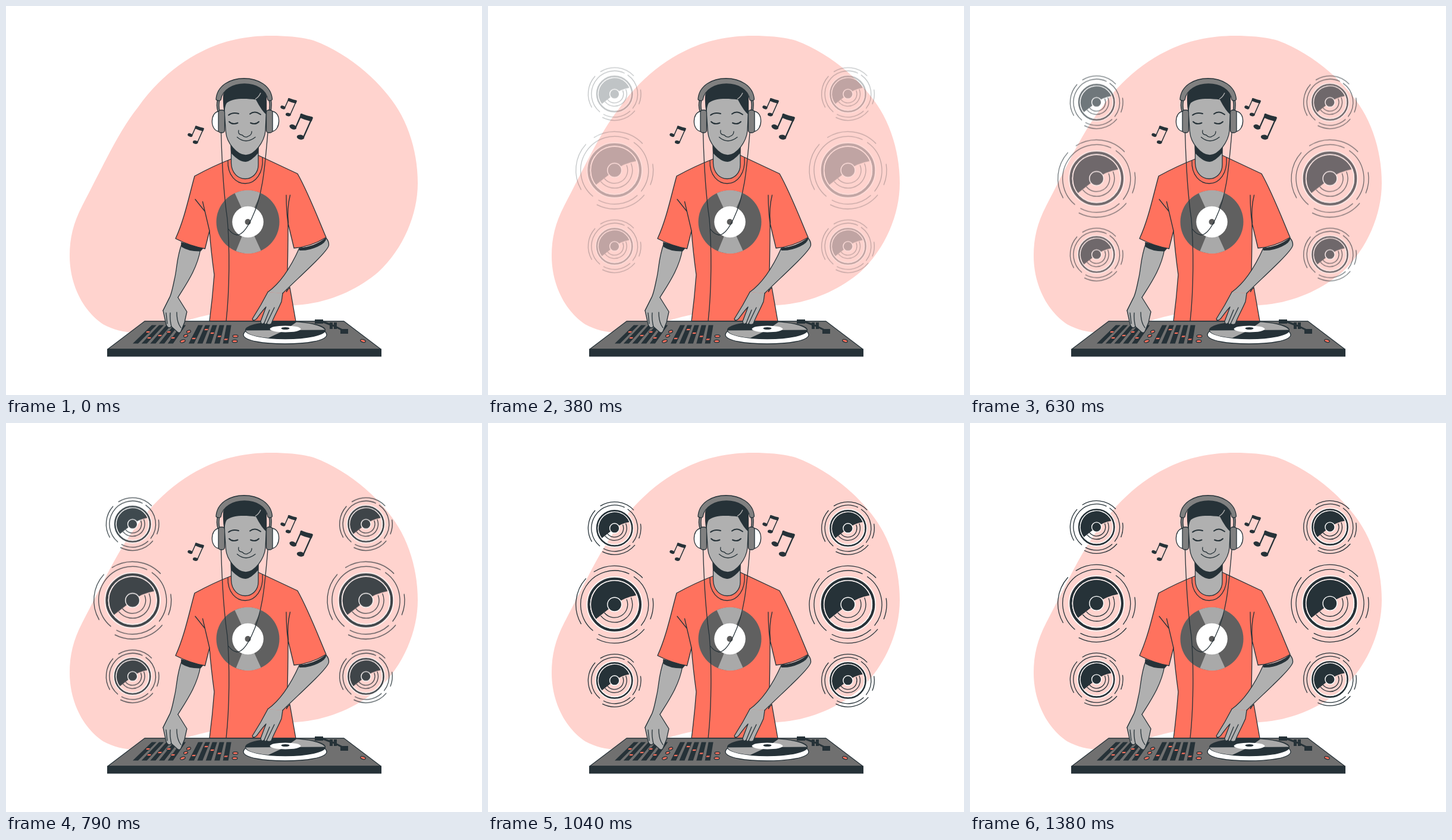
These frames come from a looping animation (800x654 px, 1.43 s). An HTML page:

```html
<!DOCTYPE html>
<html lang="en">
<head>
<meta charset="utf-8">
<title>DJ at the mixer</title>
<style>
html, body { margin: 0; width: 100%; height: 100%; overflow: hidden; background: #fff; }
svg { display: block; width: 100vw; height: 100vh; }
.ink { fill: #263238; }
.line { fill: none; stroke: #263238; stroke-width: 1.3; stroke-linecap: round; stroke-linejoin: round; }
.bold { stroke-width: 2; }
.skin { fill: #b0b0b0; }
.coral { fill: #ff725e; }
.grey { fill: #808080; }
.edge { stroke: #263238; stroke-width: 1.3; stroke-linejoin: round; stroke-linecap: round; }
#speakers * { vector-effect: non-scaling-stroke; }
</style>
</head>
<body>
<svg viewBox="0 0 800 654">
<defs>
  <g id="note" class="ink">
    <path d="M13 1Q14-.5 16 .8Q22 3 27 4L28 5L26.3 9.5Q19 8 12.500 5Z"/>
    <path class="line" style="stroke-width:1.6" d="M13.600 3L7.600 16.500M26.600 6L16.800 28"/>
    <ellipse cx="4.400" cy="16" rx="4.300" ry="2.700" transform="rotate(22 4.400 16)"/>
    <ellipse cx="13.300" cy="28" rx="4.400" ry="2.800" transform="rotate(10 13.300 28)"/>
  </g>
</defs>

<path fill="#ffd3ce" d="M445 50C475 50 500 53 517 58C582 82 635 134 659 174C681 210 692 255 692 298C692 350 668 408 626 447C590 478 540 500 487 503C430 508 390 511 342 519C318 524 300 530 260 542C225 553 192 551 163 535C130 513 107 469 107 420C107 390 113 365 128 336C165 265 190 210 222 170C250 130 290 95 330 76C365 58 405 50 445 50Z"/>

<g id="speakers"></g>

<use href="#note" x="305" y="201"/>
<use href="#note" x="461" y="154.500"/>
<use href="#note" transform="translate(476 180.500) scale(1.43)"/>

<!-- left forearm -->
<path class="skin edge" d="M296 398C286 425 288 440 283 460C279 480 277 486 275 490L264 512L289 490C304 466 322 440 327 408Z"/>
<path class="ink" d="M294 397L332 407L327 412.500Q307 413 295 405Z"/>

<!-- shirt -->
<path class="coral edge" d="M379 257Q348 269 317 286C307 322 300 358 285 391Q308 403 334.500 408L342 378C344 405 347 430 350 452Q347 492 342 530H487L477 473Q469 482 472 480Q474 420 474 365L484 407Q512 405 538 389C522 351 507 312 490 282L424 251Z"/>
<path class="line" d="M318 325L334 345M330.500 329L342 378M471 318Q471 345 474 365M477.500 318Q472 340 474.500 365"/>

<!-- right forearm -->
<path class="skin edge" d="M440 481C464 464 480 436 493 407Q518 406 538 390Q543 396 542.500 402Q542 408 520 430C502 448 480 468 465 483"/>
<path class="ink" d="M492 407.500Q518 405 538.500 390Q538 398 524 404.500Q508 412 493 411Z"/>

<!-- record print -->
<g transform="translate(406.500 363)">
  <circle r="53" fill="#606060"/>
  <path fill="#a9a9a9" d="M0 0L-22-48.200A53 53 0 0 1 22-48.200ZM0 0L-20 49A53 53 0 0 0 22 48.200Z"/>
  <circle r="26.300" fill="#fff"/>
  <circle r="5" fill="#5a5a5a"/>
</g>

<!-- neck and head -->
<path class="skin edge" d="M378.500 236V264C379 281 390 290.500 402 290.500C414 290.500 424 281 424 267V236Z"/>
<path class="line" d="M373 260C372 285 387 298.500 402 298.500C420 298.500 433 280 431 255"/>
<path class="ink" d="M377 230L378 247C388 258 396 262 403 262Q412 261 424 247L425 230Z"/>
<path class="skin edge" d="M367 160V178L369.500 212C371 230 388 251 403 251C419 250 434 228 436 210L437.500 178V160Q402 142 367 160Z"/>
<path class="ink" d="M367 182Q364 164 365 150C372 120 431 120 438 152V183Q430 177 420 157.500C400 155 381 155 371 163Q368 167 367 182Z"/>
<path d="M428 146Q425 153 419 156.500" fill="none" stroke="#b0b0b0" stroke-width="1.400"/>
<path class="line bold" d="M374 183.500Q381 178 391 181M410 181.500Q418 175 428 182.500M375 194.500Q381 200.500 389.500 196.500M411 196.500Q419 200.500 425 194.500"/>
<path class="line" d="M391 209Q389 216 397 217Q402 222.500 407 219Q413 217 413 211M388.500 220.500Q403 233 419 220.500"/>

<!-- headphones -->
<path class="grey edge" d="M355.500 158Q353 167 356 177H359Q357 167 359 158ZM442 158Q444 167 442 177H445Q447 167 445.500 158Z"/>
<path class="grey edge" d="M353 157C356 110 444 110 447.500 157Q445 161 440 158C436 122 366 122 361 158Q356 161 353 157Z"/>
<path fill="#fff" class="edge" d="M358 177C343 178 342 209 358 211ZM447 177C463 178 462 209 447 211Z"/>
<rect class="grey edge" x="357" y="175" width="10.500" height="38" rx="4"/>
<rect class="grey edge" x="437.500" y="175" width="10.500" height="38" rx="4"/>
<path class="line" d="M361.500 213C363 265 366 318 372 358C376 405 376 475 370 530M440 213C435 270 432 318 413 357C405 374 396 385 388 385Q380 384 373 374"/>

<!-- mixer -->
<path fill="#707070" class="edge" d="M233 530H568L630 577H171Z"/>
<rect class="ink" x="170" y="576.500" width="461" height="13"/>
<g id="faders"></g>
<g id="knobs"></g>

<!-- turntable -->
<path fill="#fff" class="edge" d="M399 553C401 538 440 535 469 535S537 538 539 553C538 563 505 568 469 568S400 563 399 553Z"/>
<ellipse class="ink edge" cx="469.500" cy="545" rx="67" ry="14.500"/>
<path fill="#a9a9a9" d="M469 545L403 545.500C405 552 420 556 441 558ZM469 545L488 531.500C512 533 532 538 536 544.500Z"/>
<ellipse fill="#fff" cx="469.500" cy="543" rx="26" ry="5.500"/>
<ellipse class="ink" cx="469.500" cy="542" rx="7" ry="2"/>
<path class="ink" d="M519 527H533V534H519ZM544 532H549V543H544ZM551 532H556V543H551ZM562 543H575V551H562Z"/>
<path d="M530 530L549 537L568 546" fill="none" stroke="#263238" stroke-width="3"/>

<!-- hands -->
<path class="skin edge" d="M275 490L264 512L269 535Q271 541 275 541L278 539L288 548Q292 551 294 547L300 532L304 514L289 490"/>
<path class="line" d="M276 516Q275 526 278 539M287 515Q287 528 291 536L294 541M269 516L271 534"/>
<path class="skin edge" d="M440 481L428 503L414 526Q415 531 421 526C427 518 432 511 437 506L428 530Q429 537 434 533Q435 537 438 534Q442 537 446 534C449 525 457 511 463 497L465 483"/>
<path class="line" d="M443 511L434 533M451 507L438 534"/>
</svg>
<script>
const LOOP = 1430;
const el = id => document.getElementById(id);
const polar = (r, deg) => {
  const a = deg * Math.PI / 180;
  return (r * Math.cos(a)).toFixed(2) + ' ' + (r * Math.sin(a)).toFixed(2);
};
const arc = (r, from, to) =>
  `M${polar(r, from)}A${r} ${r} 0 ${to - from > 180 ? 1 : 0} 1 ${polar(r, to)}`;
const ring = (r, color, width) =>
  `<circle r="${r}" fill="none" stroke="${color}" stroke-width="${width}"/>`;

const waves = [
  [65, 150, 222], [65, 238, 316], [65, 351, 382], [65, 40, 117],
  [57, 130, 295], [57, 305, 398], [57, 48, 118],
  [30, -22, 140], [22, -22, 140]
].map(a => arc(...a)).join('');

const speaker = k =>
  `<path class="line" d="${waves}"/>` +
  ring(46.4, '#fff', 1.4) + ring(43.2, '#263238', 4.2 * k) + ring(40.4, '#fff', 1.4) +
  `<path class="ink" d="${arc(39.5, 142, 337)}Q16 -12 0 0Z"/>` +
  `<circle class="ink" r="11.9" stroke="#fff" stroke-width="1.4"/>`;

const rows = [[177.2, .682], [305.4, 1], [433.2, .682]];
el('speakers').innerHTML = [212.7, 605].map(x => rows.map(([y, k]) =>
  `<g transform="translate(${x} ${y}) scale(${k})">${speaker(k)}</g>`).join('')).join('');

function faders(top, bottom, topStep, bottomStep) {
  let d = '';
  for (let i = 0; i < 5; i++) {
    const a = top + i * topStep, b = bottom + i * bottomStep;
    d += `M${a} 536.5h8L${b + 9} 567.5h-9Z`;
  }
  return `<path class="ink" d="${d}"/>`;
}
el('faders').innerHTML = faders(245, 213, 12.3, 14.7) + faders(323, 307, 11.9, 14.4);

const slots = [[239, 548], [241, 558], [259, 554], [274, 548], [281, 558],
  [316, 559], [337, 544], [347, 550], [359, 555.5], [370, 560.5]];
const dots = [[307, 547.5], [302, 554.5], [297, 563.5], [385.5, 555], [384.5, 563.5], [600, 563]];
el('knobs').innerHTML =
  slots.map(([x, y]) => `<path class="coral edge" style="stroke-width:.8" d="M${x - 2.5} ${y - 1.5}h6l-1.5 3h-6Z"/>`).join('') +
  dots.map(([x, y], i) => `<ellipse class="coral edge" cx="${x}" cy="${y}" rx="${i > 1 ? 4.4 : 3.6}" ry="2.2" transform="rotate(${i < 3 ? -18 : i > 4 ? 18 : 0} ${x} ${y})"/>`).join('');

const ease = p => (1 - Math.cos(Math.PI * Math.min(1, Math.max(0, p)))) / 2;

// speakers drop in while fading, rest, then begin to float up
function draw(t) {
  const p = ease(t / 1100);
  const y = -40 * (1 - p) - 10 * ease((t - 1150) / 750);
  el('speakers').setAttribute('transform', `translate(0 ${y.toFixed(2)})`);
  el('speakers').setAttribute('opacity', Math.min(1, p * 1.08).toFixed(3));
}

const start = performance.now();
function tick() {
  draw((performance.now() - start) % LOOP);
  requestAnimationFrame(tick);
}
draw(0);
requestAnimationFrame(tick);
</script>
</body>
</html>
```
